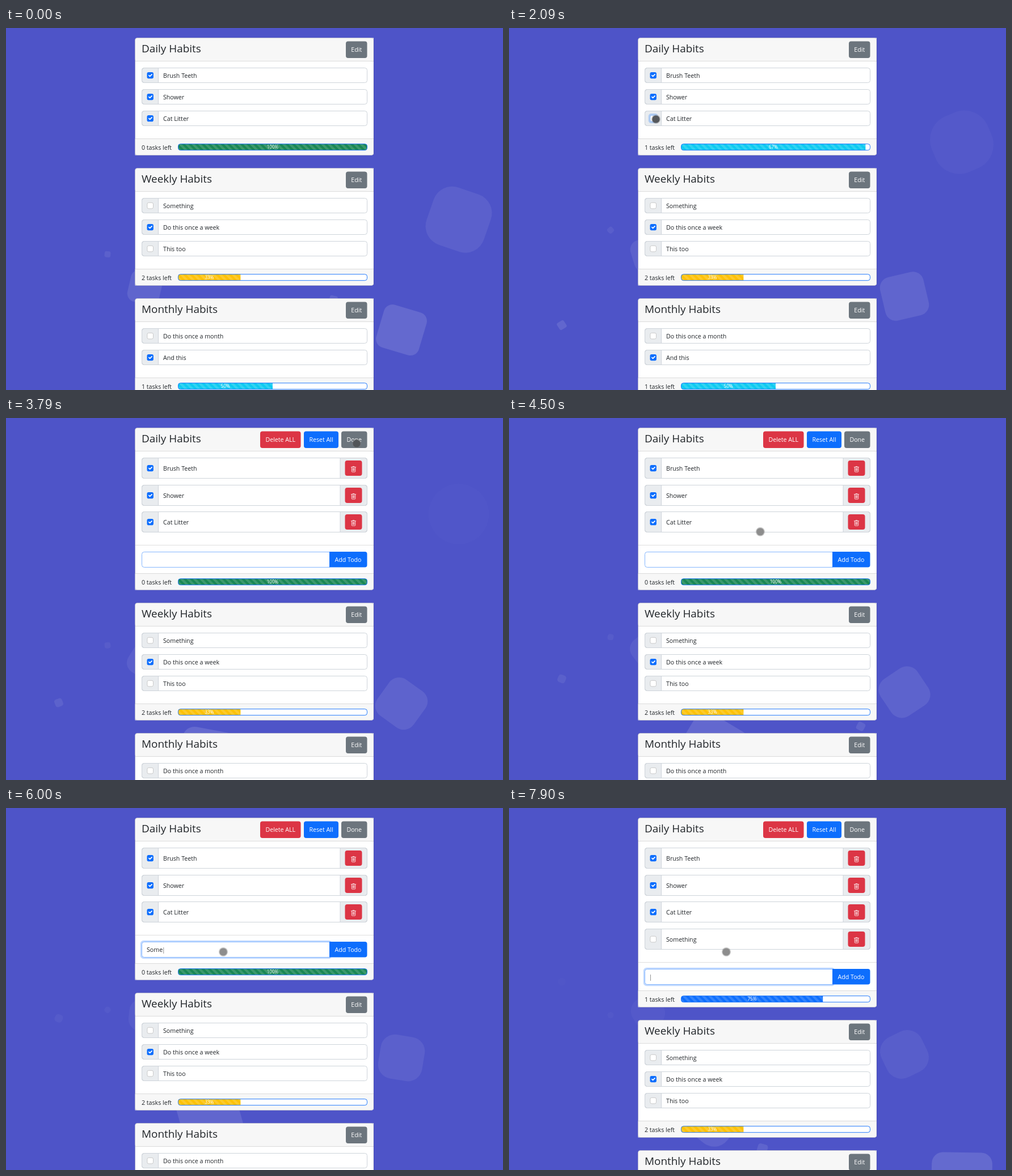
Animation of 876x639 px, one loop 8000 ms. Source, as an HTML page:

```html
<!DOCTYPE html>
<html lang="en">
<head>
<meta charset="utf-8">
<title>Habits</title>
<style>
  html, body { margin: 0; width: 100%; height: 100%; overflow: hidden; background: #4e54c8; }
  svg { display: block; width: 876px; height: 639px; font-family: "Open Sans", "Noto Sans", sans-serif; }
  text { font-size: 10.65px; fill: #212529; white-space: pre; }
  .title { font-size: 18.9px; font-weight: 500; }
  .btn { fill: #fff; text-anchor: middle; }
  .pct { font-size: 8.1px; fill: #fff; text-anchor: middle; }
</style>
</head>
<body>
<svg viewBox="0 0 876 639">
  <defs>
    <pattern id="stripes" width="8.06" height="8.06" patternUnits="userSpaceOnUse">
      <rect width="4.03" height="8.06" fill="#fff" fill-opacity=".15"/>
    </pattern>
  </defs>
  <g id="squares"></g>
  <g id="cards"></g>
  <g id="pointer"></g>
</svg>
<script>
const LOOP = 8000;
const REM = 11.4, SCALE = 0.7125, FLOOR = 749;
const BLUE = '#0d6efd', GREEN = '#198754', CYAN = '#0dcaf0', YELLOW = '#ffc107';
const RED = '#dc3545', GREY = '#6c757d', LINE = '#ced4da', SIDE = '#e9ecef';

// moments of the interaction, ms
const UNCHECK = 2040, RECHECK = 2680, EDIT = 3600, FOCUS = 4650, TYPE = 5500, KEY = 130, ADD = 6900;
const TYPED = 'Something';

// floating squares: centre x, css size, period s, age s at the start
const SQUARES = [
  [245, 80, 25, 12.95], [93, 20, 12, 3.37], [620, 20, 25, 8.95],
  [577, 20, 25, 12.95], [697, 110, 25, 9.95], [358, 150, 25, 5.95],
  [446.5, 25, 45, 15.6], [179, 15, 35, 22.16], [798, 150, 10.9, 7.1]
];

// pointer path: time, x, y
const PATH = [
  [1000, 420, 250], [1280, 317, 181], [1620, 263, 157], [1850, 259, 161],
  [2790, 259, 161], [3420, 618, 45], [4300, 618, 45], [4600, 383, 254], [LOOP, 383, 254]
];
const PRESSES = [[1960, 2130], [2600, 2740], [3540, 3860], [4580, 4720]];

const byId = id => document.getElementById(id);
const clamp = v => Math.max(0, Math.min(1, v));

// cubic-bezier(.25, .1, .25, 1)
function ease(x) {
  x = clamp(x);
  let lo = 0, hi = 1, u = x;
  const curve = (a, b) => 3 * a * u * (1 - u) ** 2 + 3 * b * u * u * (1 - u) + u ** 3;
  for (let i = 0; i < 20; i++) {
    u = (lo + hi) / 2;
    if (curve(.25, .25) < x) lo = u; else hi = u;
  }
  return curve(.1, 1);
}

const rect = (x, y, w, h, r, fill, more = '') =>
  `<rect x="${x}" y="${y}" width="${w}" height="${h}" rx="${r}" fill="${fill}" ${more}/>`;
const text = (x, y, s, cls = '') => `<text x="${x}" y="${y}" class="${cls}">${s}</text>`;
const hline = y => `<path d="M228 ${y}H648" stroke="#000" stroke-opacity=".125"/>`;

// box with separate left and right corner radii
const box = (x, y, w, h, l, r, fill, stroke = 'none') =>
  `<path d="M${x + l} ${y}h${w - l - r}a${r} ${r} 0 0 1 ${r} ${r}v${h - 2 * r}a${r} ${r} 0 0 1 ${-r} ${r}` +
  `h${l + r - w}a${l} ${l} 0 0 1 ${-l} ${-l}v${2 * l - h}a${l} ${l} 0 0 1 ${l} ${-l}z" fill="${fill}" stroke="${stroke}"/>`;

const button = (x, y, w, h, label, fill) =>
  rect(x, y, w, h, 4, fill) + text(x + w / 2, y + h / 2 + 4, label, 'btn');

function checkbox(cx, cy, on, focus) {
  const x = cx - 5.7, y = cy - 5.7;
  const ring = focus
    ? rect(x - 2.8, y - 2.8, 17, 17, 5, BLUE, `fill-opacity="${.25 * focus}"`) : '';
  if (!on) return ring + rect(x + .4, y + .4, 10.6, 10.6, 2.6, '#fff', `stroke="${focus ? '#86b7fe' : '#bfbfbf'}" stroke-width=".8"`);
  return ring + rect(x, y, 11.4, 11.4, 2.8, BLUE) +
    `<path transform="translate(${x} ${y}) scale(.57)" d="M6 10l3 3l6-6" fill="none" stroke="#fff" stroke-width="3" stroke-linecap="round" stroke-linejoin="round"/>`;
}

const trash = (x, y) =>
  `<g transform="translate(${x} ${y}) scale(.7)" fill="none" stroke="#fff" stroke-width="1.1" stroke-linecap="round">` +
  `<path d="M2 3.2H14M6 3V1.6H10V3M3.4 3.5V14Q3.4 15.3 4.6 15.3H11.4Q12.6 15.3 12.6 14V3.5M5.9 6V12.4M8 6V12.4M10.1 6V12.4"/></g>`;

function row(y, [label, on, focus], edit) {
  const h = edit ? 36 : 26, cy = y + h / 2;
  let s = rect(239.5, y, 397, h, 4, '#fff') + box(239.5, y, 29, h, 4, 0, SIDE, LINE);
  if (edit) {
    s += box(589, y, 47.5, h, 0, 4, SIDE, LINE) + rect(597.5, cy - 13.5, 30, 27, 4, RED) + trash(606.9, cy - 4);
  }
  s += rect(239.5, y, 397, h, 4, 'none', `stroke="${LINE}"`);
  return s + checkbox(254.2, cy + .1, on, focus) + text(277, cy + 4.2, label);
}

function progress(y, part, label, color) {
  const w = 333 * part, r = part > .995 ? 4 : 0;
  return rect(303.5, y, 333, 11, 4, '#fff') +
    box(303.5, y, w, 11, 4, r, color) + box(303.5, y, w, 11, 4, r, 'url(#stripes)') +
    rect(303.5, y, 333, 11, 4, 'none', `stroke="${BLUE}" stroke-width=".9"`) +
    text(303.5 + w / 2, y + 8.5, label + '%', 'pct');
}

function addForm(y, form) {
  let s = hline(y);
  if (form.focus) s += box(236.7, y + 9.2, 336.6, 32.6, 6, 4, `rgba(13,110,253,${.25 * form.focus})`);
  s += box(239.5, y + 12, 331, 27, 4, 0, '#fff', form.focus ? '#86b7fe' : LINE);
  s += box(570, y + 11.5, 66.5, 27.5, 0, 4, BLUE) + text(603, y + 29.6, 'Add Todo', 'btn');
  s += `<text x="248" y="${y + 29.6}">${form.value}` +
    (form.caret ? '<tspan font-weight="300" dx="-1.2">|</tspan>' : '') + '</text>';
  return s;
}

const cardHeight = (n, edit) => edit ? 53 + Math.round(47.7 * n) + 11 + 50 + 29 : 53 + 38 * n + 11 + 29;

function card(y, c) {
  const n = c.rows.length, h = cardHeight(n, c.form), foot = y + h - 29;
  const left = c.rows.filter(r => !r[1]).length;
  let s = rect(227.5, y, 420.5, h, 4, '#fff');
  s += box(227.5, y, 420.5, 41, 4, 0, '#f7f7f7') + box(227.5, foot, 420.5, 29, 0, 4, '#f7f7f7');
  s += rect(227.5, y, 420.5, h, 4, 'none', 'stroke="#000" stroke-opacity=".125"');
  s += hline(y + 41) + hline(foot) + text(239, y + 25.7, c.title, 'title');
  if (c.form) {
    s += button(448, y + 6, 71.5, 29.5, 'Delete ALL', RED) +
      button(525, y + 6, 61, 29.5, 'Reset All', BLUE) +
      button(591, y + 6, 45.5, 29.5, 'Done', GREY) + addForm(foot - 50, c.form);
  } else {
    s += button(599, y + 6, 37.5, 29.5, 'Edit', GREY);
  }
  c.rows.forEach((r, i) => { s += row(y + 53 + Math.round((c.form ? 47.7 : 38) * i), r, c.form); });
  s += text(239, foot + 19.1, left + ' tasks left');
  return s + progress(foot + 9.2, c.part, Math.round(100 * (n - left) / n), c.color);
}

function daily(t) {
  const off = t >= UNCHECK && t < RECHECK;
  const ring = t >= UNCHECK - 60 && t < EDIT ? ease((t - UNCHECK + 120) / 150) : 0;
  const c = {
    title: 'Daily Habits',
    rows: [['Brush Teeth', true], ['Shower', true], ['Cat Litter', !off, ring]],
    color: off ? CYAN : t >= ADD ? BLUE : GREEN
  };
  const grow = at => ease((t - at) / 600);
  c.part = 1 - (grow(UNCHECK) - grow(RECHECK)) / 3 - grow(ADD) / 4;
  if (t >= EDIT) {
    const count = Math.max(0, Math.min(TYPED.length, Math.floor((t - TYPE) / KEY) + 1));
    const typing = t >= TYPE && t < 6800;
    const blink = Math.floor((t - (t < TYPE ? FOCUS : 6800)) / 530) % 2 === 0;
    c.form = {
      focus: ease((t - FOCUS) / 150),
      value: t < ADD ? TYPED.slice(0, count) : '',
      caret: t >= FOCUS && (typing || blink)
    };
    if (t >= ADD) c.rows.push([TYPED, false]);
  }
  return c;
}

const WEEKLY = {
  title: 'Weekly Habits', part: .33, color: YELLOW,
  rows: [['Something', false], ['Do this once a week', true], ['This too', false]]
};
const MONTHLY = {
  title: 'Monthly Habits', part: .5, color: CYAN,
  rows: [['Do this once a month', false], ['And this', true]]
};

// squares rise, spin, round off and fade; they hang from the page bottom
function square([x, size, period, age], t, shift) {
  const p = ((age + t / 1000) / period) % 1, a = size * SCALE;
  const y = FLOOR + shift + 150 * SCALE - a / 2 - 1000 * SCALE * p;
  return rect(-a / 2, -a / 2, a, a, a * p / 2, '#fff',
    `fill-opacity="${Math.max(.012, .2 * (1 - p))}" transform="translate(${x} ${y}) rotate(${720 * p})"`);
}

function pointer(t) {
  if (t < PATH[0][0]) return '';
  const i = PATH.findIndex(k => k[0] > t), [t0, x0, y0] = PATH[i - 1], [t1, x1, y1] = PATH[i];
  let k = (t - t0) / (t1 - t0);
  if (t > 2000) k = k * k * (3 - 2 * k);
  const x = x0 + (x1 - x0) * k, y = y0 + (y1 - y0) * k;
  const down = PRESSES.some(([a, b]) => t >= a && t < b);
  return `<circle cx="${x}" cy="${y}" r="8" fill="#777" fill-opacity=".4"/>` +
    `<circle cx="${x}" cy="${y}" r="6.6" fill="${down ? '#505356' : '#8a8a8a'}" fill-opacity=".95"/>`;
}

function draw(t) {
  const first = daily(t), h = cardHeight(first.rows.length, first.form), shift = h - 207;
  byId('stripes').setAttribute('patternTransform',
    `translate(${303.5 + REM * (1 - t / 1000 % 1)} ${204.5 + shift}) rotate(-45)`);
  byId('squares').innerHTML = SQUARES.map(q => square(q, t, shift)).join('');
  byId('cards').innerHTML = card(17.5, first) + card(247.5 + shift, WEEKLY) + card(477.5 + shift, MONTHLY);
  byId('pointer').innerHTML = pointer(t);
}

const start = performance.now();
function frame() {
  draw((performance.now() - start) % LOOP);
  requestAnimationFrame(frame);
}
frame();
</script>
</body>
</html>
```
